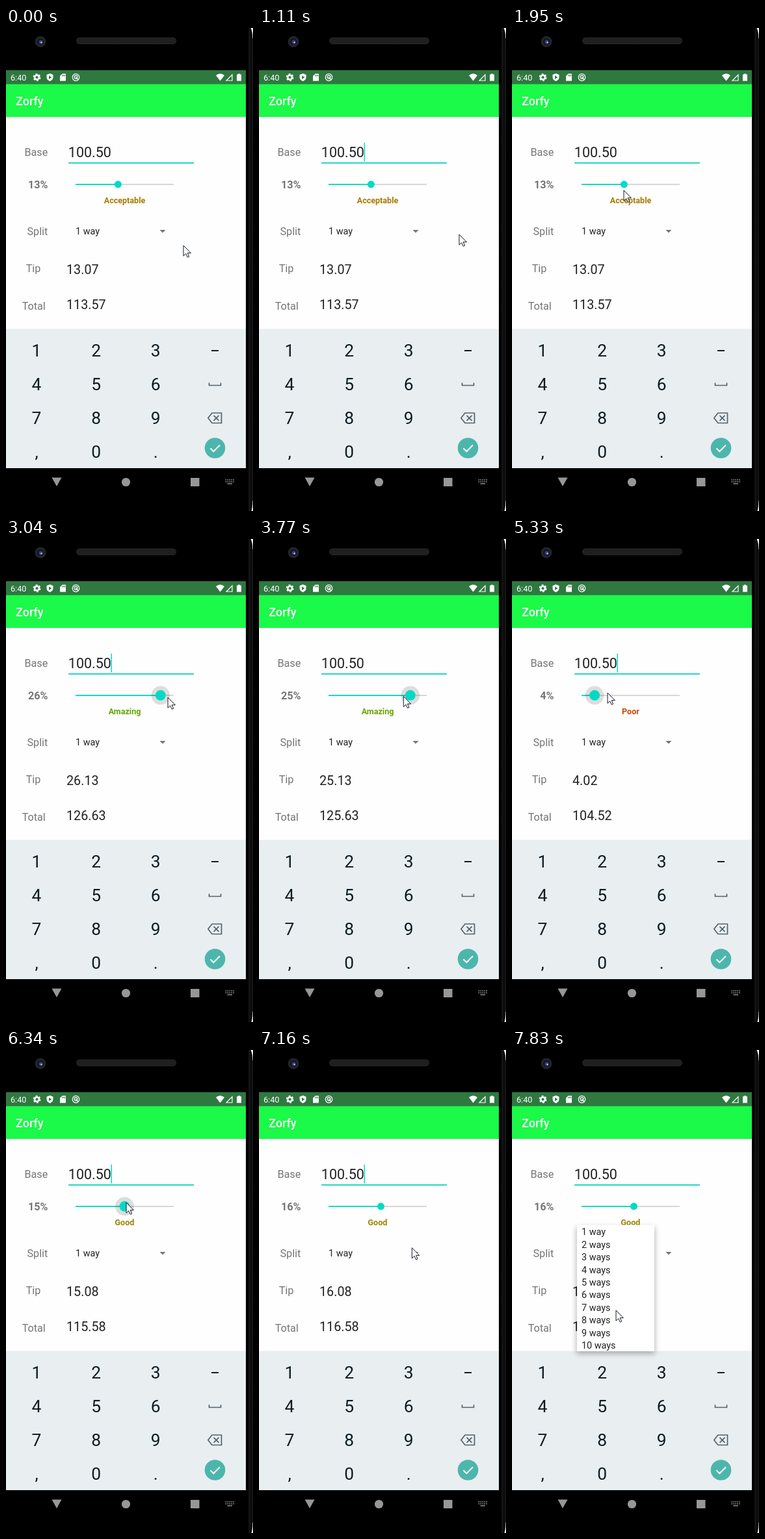
Recreate the animation shown at these times as an HTML page. Size 380 px wide and 744 px high, loop 7.99 s.

```html
<!DOCTYPE html>
<html lang="en">
<head>
<meta charset="utf-8">
<title>Tip calculator</title>
<style>
  html, body { margin: 0; width: 100%; height: 100%; overflow: hidden; background: #000; }
  svg { display: block; width: 380px; height: 744px; font-family: Roboto, sans-serif; }
  .label { font-size: 16.16px; fill: #757575; }
  .value { font-size: 19.75px; fill: #212121; }
  .item { font-size: 14.4px; fill: #212121; }
  .key { font-size: 26.4px; fill: #0b1c22; text-anchor: middle; }
</style>
</head>
<body>
<svg viewBox="0 0 380 744">
  <defs>
    <pattern id="mesh" width="4" height="4" x="110" y="15.5" patternUnits="userSpaceOnUse">
      <path d="M0 0L4 4M4 0L0 4" stroke="#2b2b2b" stroke-width=".8"/>
    </pattern>
    <linearGradient id="edge">
      <stop stop-color="#000"/><stop offset=".35" stop-color="#191919"/>
      <stop offset=".6" stop-color="#060606"/><stop offset="1" stop-color="#1d1d1d"/>
    </linearGradient>
    <filter id="blur" x="-20%" y="-20%" width="140%" height="140%">
      <feGaussianBlur stdDeviation="4"/>
    </filter>
  </defs>

  <!-- phone body -->
  <rect width="380" height="744"/>
  <rect x="372" width="8" height="744" fill="url(#edge)"/>
  <path d="M376.500 0Q379.500 6 379.500 16H380V0ZM380 728H379.500Q379.500 738 377.500 744H380Z" fill="#fff"/>
  <circle cx="53" cy="21" r="8.500" fill="#242427"/>
  <circle cx="53" cy="21" r="5" fill="#14151f"/>
  <circle cx="53.500" cy="21.500" r="2.900" fill="#35408c"/>
  <circle cx="54.500" cy="22.300" r="1.200" fill="#b9c0f0"/>
  <rect x="108.500" y="15" width="153" height="9.500" rx="4.500" fill="#181818"/>
  <rect x="108.500" y="15" width="153" height="9.500" rx="4.500" fill="url(#mesh)" stroke="#2b2b2b" stroke-width=".8"/>

  <!-- bars -->
  <rect y="65" width="369" height="22" fill="#2f7840"/>
  <rect y="86.500" width="369" height="51" fill="#1bf949"/>
  <rect y="137" width="369" height="327" fill="#fefefe"/>
  <rect y="463.500" width="369" height="214.500" fill="#e9eef1"/>
  <text x="7" y="80.500" font-size="12.6" fill="#fff">6:40</text>
  <text x="15" y="119" font-size="18" font-weight="500" fill="#fff">Zorfy</text>

  <!-- status icons -->
  <g fill="none" stroke="#fff">
    <circle cx="47.500" cy="76" r="3.300" stroke-width="2.400"/>
    <circle cx="47.500" cy="76" r="5" stroke-width="1.800" stroke-dasharray="2.900 2.336"/>
    <circle cx="107.500" cy="76" r="5.300" stroke-width="1.200"/>
    <circle cx="107.500" cy="75.600" r="2.500" stroke-width="1.200"/>
    <path d="M107 75.500L111 79.500" stroke-width="1.300"/>
    <path d="M339 81L348 72V81Z" stroke-width="1.200"/>
  </g>
  <g fill="#fff">
    <path d="M67.500 70L72.500 72V75.500Q72.500 80 67.500 82Q62.500 80 62.500 75.500V72Z"/>
    <path d="M66 73.300L70.300 76L66 78.700Z" fill="#2f7840"/>
    <path d="M86.500 70.500H92V81.500H83V74Z"/>
    <path d="M86.700 72V74.500M88.600 72V74.500M90.500 72V74.500" stroke="#2f7840"/>
    <path d="M323 73Q329.500 67.500 336 73L329.500 81.500Z"/>
    <path d="M357 70.500H360V71.500H362V81.500H355V71.500H357Z"/>
  </g>

  <!-- form -->
  <g class="label">
    <text x="28.500" y="197">Base</text>
    <text id="pct" x="64.500" y="247" font-weight="700" text-anchor="end"></text>
    <text x="32.500" y="319">Split</text>
    <text x="30.700" y="376">Tip</text>
    <text x="24.700" y="434">Total</text>
  </g>
  <text x="95.800" y="198.500" font-size="21.500" fill="#212121">100.50</text>
  <rect x="96" y="207" width="193" height="1.700" fill="#03cfba"/>
  <rect id="caret" x="161.500" y="176.500" width="1.500" height="29" fill="#03dac5"/>
  <rect x="107" y="240" width="151" height="1.800" fill="#d4d4d4"/>
  <rect id="fill" x="107" y="240" height="1.800" fill="#03dac5"/>
  <circle id="halo" cy="240.800" r="14.300"/>
  <circle id="thumb" cy="240.800" fill="#03dac5"/>
  <text id="mood" x="182.500" y="269.700" font-size="12.57" font-weight="700" text-anchor="middle"></text>
  <text class="item" x="107" y="318.300">1 way</text>
  <path d="M236.500 311H245.500L241 315.500Z" fill="#757575"/>
  <text id="tip" class="value" x="93" y="379"></text>
  <text id="total" class="value" x="93" y="433"></text>

  <!-- keyboard -->
  <g id="keys"></g>
  <g fill="none" stroke="#53636a" stroke-width="1.700">
    <path d="M316 497H327" stroke="#0b1c22" stroke-width="2"/>
    <path d="M312.500 546.500V550.500H330.500V546.500"/>
    <path d="M317 593H331.500V608.500H317L310.800 600.800Z" stroke-linejoin="round"/>
    <path d="M319.500 596.800L327.500 604.800M327.500 596.800L319.500 604.800"/>
  </g>
  <circle cx="321.500" cy="647" r="15.800" fill="#4db6ac"/>
  <path d="M314.500 647.500L319.300 652.300L329 642.500" fill="none" stroke="#fff" stroke-width="2"/>

  <!-- navigation -->
  <g fill="#979797">
    <path d="M70.500 692.500H85.500L78 706Z"/>
    <circle cx="184.500" cy="699.500" r="6.600"/>
    <rect x="284" y="693" width="13.500" height="13"/>
    <path d="M337.500 696H351M337.500 699H351" fill="none" stroke="#979797" stroke-width="1.500" stroke-dasharray="1.700 1.250"/>
    <rect x="340.500" y="701.300" width="7.500" height="1.400"/>
  </g>

  <g id="popup">
    <rect x="99" y="273" width="121" height="195" opacity=".28" filter="url(#blur)"/>
    <rect x="100" y="269.500" width="119" height="194.500" fill="#fff"/>
  </g>
  <path id="cursor" d="M0 0V16.200L3.700 12.700L6.300 18.200L8.700 17.100L6.200 11.700H11.400Z" fill="#fff" stroke="#111827"/>
</svg>
<script>
const LOOP = 7990, STEP = 100, SHIFT = 30;
const GRAB = 2230, RELEASE = 6330, LAG = 100;
const TRACK = 107, UNIT = 5.03;

const $ = id => document.getElementById(id);
const set = (id, attrs) => {
  for (const k in attrs) $(id).setAttribute(k, attrs[k]);
};
const clamp = (v, lo, hi) => Math.min(hi, Math.max(lo, v));
const ramp = (t, a, b) => clamp((t - a) / (b - a), 0, 1);

function addText(parent, cls, x, y, str) {
  const el = document.createElementNS('http://www.w3.org/2000/svg', 'text');
  el.textContent = str;
  $(parent).append(el);
  for (const [k, v] of Object.entries({ class: cls, x, y })) el.setAttribute(k, v);
}

[...'123456789,0.'].forEach((c, i) =>
  addText('keys', 'key', 47 + 91.6 * (i % 3), 506.4 + 52 * Math.floor(i / 3), c));
for (let n = 1; n <= 10; n++)
  addText('popup', 'item', 107, 285.2 + 19.45 * (n - 1), n + (n > 1 ? ' ways' : ' way'));

// Where the pointer turns or rests: time, x, y
const turns = [
  [100, 273, 335], [630, 308, 318], [1030, 308, 318], [1930, 172, 250], [GRAB, 172, 241],
  [3030, 249, 244], [3230, 260, 244], [3430, 260, 244], [4130, 172, 240], [4430, 172, 240],
  [5130, 110, 239], [5330, 147, 237], [5630, 179, 236], [5930, 179, 236], [RELEASE, 185, 235],
  [6930, 214, 290], [7230, 246, 312], [7530, 246, 312], [7830, 160, 401]
];
function pointer(t) {
  const i = clamp(turns.findIndex(k => k[0] > t), 1, turns.length - 1);
  const next = t >= turns[turns.length - 1][0] ? turns.length - 1 : i;
  const [ta, xa, ya] = turns[next - 1], [tb, xb, yb] = turns[next];
  const f = ramp(t, ta, tb);
  return [xa + (xb - xa) * f, ya + (yb - ya) * f];
}

const moods = ['Poor', 'Acceptable', 'Good', 'Great', 'Amazing'];
const worst = [213, 0, 0], best = [56, 178, 0];
const blend = f => 'rgb(' + worst.map((w, i) =>
  Math.round((w ** 2.2 * (1 - f) + best[i] ** 2.2 * f) ** (1 / 2.2))) + ')';

function draw(now) {
  // The screen refreshes in even steps
  const t = Math.floor((now % LOOP - SHIFT) / STEP) * STEP + SHIFT;
  // While held, the thumb trails the pointer
  const [dragX] = pointer(clamp(t - LAG, GRAB, RELEASE));
  const p = clamp(Math.round((dragX - TRACK) / UNIT), 0, 30);
  const x = TRACK + p * UNIT;
  const cents = Math.round(100.5 * p);
  const held = ramp(t, GRAB - 100, GRAB + 100) - ramp(t, RELEASE, RELEASE + 300);

  $('pct').textContent = p + '%';
  $('mood').textContent = moods[clamp(Math.floor(p / 5) - 1, 0, 4)];
  $('tip').textContent = (cents / 100).toFixed(2);
  $('total').textContent = ((10050 + cents) / 100).toFixed(2);
  set('mood', { fill: blend(p / 30) });
  set('fill', { width: x - TRACK });
  set('halo', { cx: x, opacity: 0.13 * held });
  set('thumb', { cx: x, r: 5.5 + 2.5 * held });
  set('caret', { opacity: t > STEP && (t + 45) % 1000 < 500 ? 1 : 0 });
  set('popup', { opacity: ramp(t, 7430, 7630) });
  set('cursor', { transform: `translate(${pointer(t)})` });
}

const start = performance.now();
function loop() {
  draw(performance.now() - start);
  requestAnimationFrame(loop);
}
loop();
</script>
</body>
</html>
```
